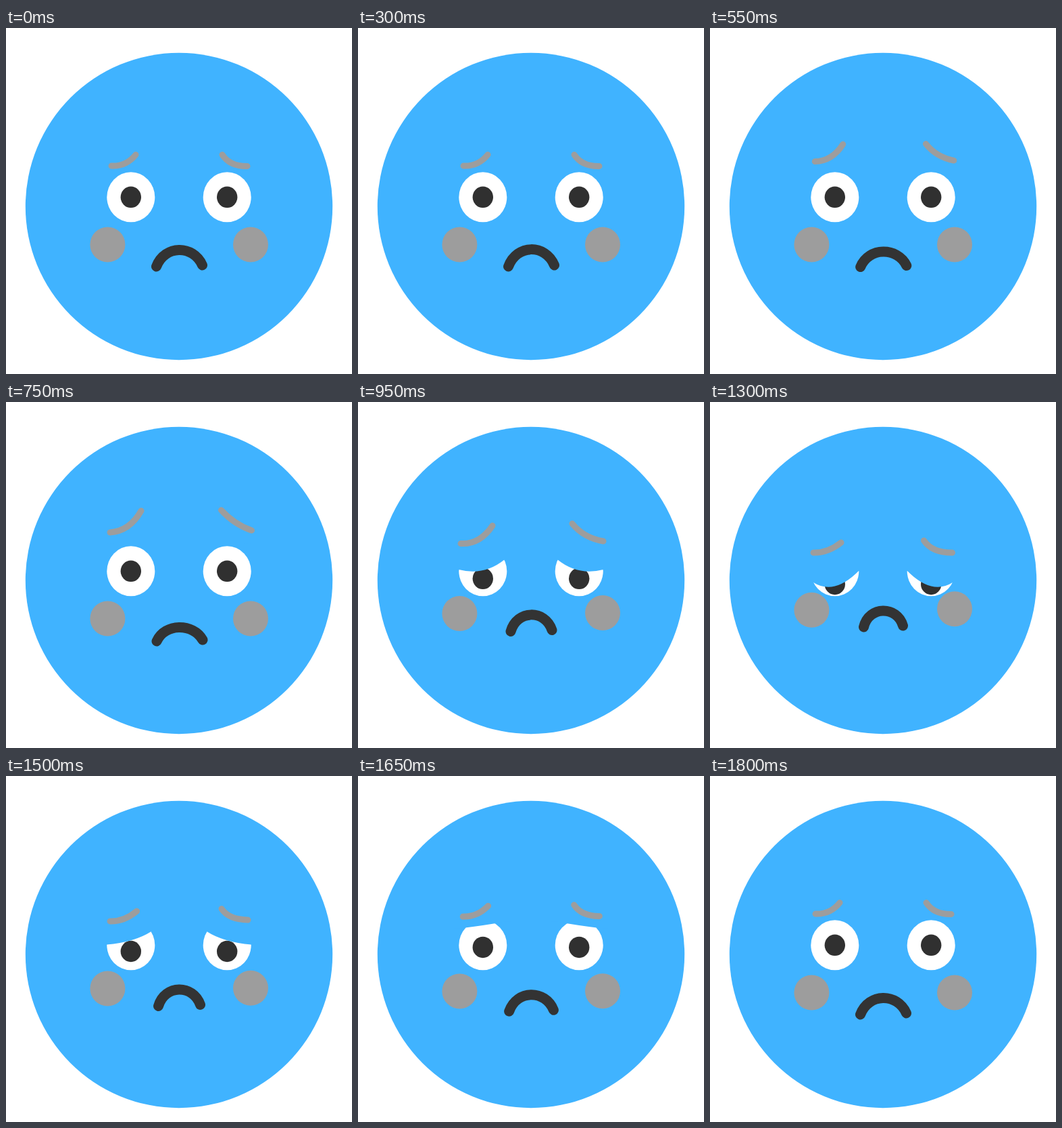
These frames come from a looping animation (512 by 512 pixels, 2000 ms). An HTML page:

```html
<!DOCTYPE html>
<html lang="en">
<head>
<meta charset="utf-8">
<title>Sad face</title>
<style>
  html, body { margin: 0; width: 100%; height: 100%; overflow: hidden; background: #fff; }
  svg { display: block; width: 100%; height: 100%; }
  .line { fill: none; stroke-linecap: round; stroke-linejoin: round; }
  .brow { stroke: #9d9d9d; stroke-width: 9; }
  .mouth { stroke: #333; stroke-width: 15; }
  .skin { fill: #40b3ff; }
  .cheek { fill: #9d9d9d; }
  .pupil { fill: #303030; }
</style>
</head>
<body>
<svg viewBox="0 0 512 512">
  <defs>
    <g id="eye">
      <ellipse cx="184.8" cy="250.3" rx="35.5" ry="37" fill="#fff"/>
      <ellipse id="pupil" class="pupil" cx="184.8" rx="15.2" ry="15.7"/>
      <path id="lid" class="skin"/>
    </g>
  </defs>
  <circle class="skin" cx="256" cy="264" r="227.2"/>
  <use href="#eye"/>
  <use href="#eye" transform="translate(512) scale(-1 1)"/>
  <circle id="cheekL" class="cheek" cx="150.4" r="26"/>
  <circle id="cheekR" class="cheek" cx="362" r="26"/>
  <path id="browL" class="line brow"/>
  <path id="browR" class="line brow"/>
  <path id="mouth" class="line mouth"/>
</svg>
<script>
const LOOP = 2000, STEP = 50;
const openLid = [149, 210, 185, 208, 219, 208];

// brows and lid: start, control, end; mouth: left x, y, right x, arch y
const rest = {
  browL: [156, 204, 178, 205, 192, 187.5],
  browR: [320, 187.5, 331.5, 205, 357, 204.5],
  lid: openLid, mouth: [222.5, 353, 290.5, 320.7], pupil: [250.3], cheek: [320.5]
};
const tense = { ...rest, mouth: [222.5, 353, 290.5, 319.5] };
const raised = {
  browL: [154, 193, 183, 191, 200, 161],
  browR: [318.5, 160, 337.5, 181, 363.5, 190],
  lid: openLid, mouth: [223, 354, 291, 327], pupil: [250.3], cheek: [320.5]
};
const heavy = {
  browL: [152, 209.5, 180.5, 211, 199, 183],
  browR: [317, 180, 334, 201, 363, 206],
  lid: [149, 248, 187, 257.5, 217, 233], mouth: [226, 339.5, 287, 307], pupil: [261.3], cheek: [313]
};
const drowsy = {
  browL: [153, 223, 174.5, 223.5, 194, 208],
  browR: [316.5, 205, 328.5, 223, 358.5, 223],
  lid: [153, 267, 183.5, 286.5, 220, 250], mouth: [227.5, 333, 285.5, 301.3], pupil: [269.5], cheek: [307.8]
};
const waking = {
  browL: [154, 215, 175, 215.5, 193.5, 200],
  browR: [319, 196.5, 329.5, 212.3, 358, 213],
  lid: [149, 249.5, 190, 246, 215, 230], mouth: [225.5, 340.5, 287.5, 308.2], pupil: [259.5], cheek: [314.5]
};

const times = [0, 300, 750, 950, 1300, 1500, 1800, LOOP];
const poses = [rest, tense, raised, heavy, drowsy, waking, rest, rest];

// Monotone cubic: smooth through the poses without overshoot
function slope(v, i) {
  if (i === 0 || i === v.length - 1) return 0;
  const a = (v[i] - v[i - 1]) / (times[i] - times[i - 1]);
  const b = (v[i + 1] - v[i]) / (times[i + 1] - times[i]);
  return a * b > 0 ? 2 * a * b / (a + b) : 0;
}

function blend(v, t) {
  let i = 0;
  while (i < times.length - 2 && t >= times[i + 1]) i++;
  const h = times[i + 1] - times[i], u = (t - times[i]) / h;
  const w = u * u * (3 - 2 * u);
  return v[i] + (v[i + 1] - v[i]) * w
    + h * u * (1 - u) * (slope(v, i) * (1 - u) - slope(v, i + 1) * u);
}

const part = (name, t) => rest[name].map((_, k) => blend(poses.map(p => p[name][k]), t));
const set = (id, attr, value) => document.getElementById(id).setAttribute(attr, value);
const curve = ([x1, y1, cx, cy, x2, y2]) => `M${x1} ${y1}Q${cx} ${cy} ${x2} ${y2}`;

function draw(t) {
  for (const id of ["browL", "browR"]) set(id, "d", curve(part(id, t)));

  const [x1, y1, cx, cy, x2, y2] = part("lid", t);
  set("lid", "d", `M142 ${y1}H${x1}Q${cx} ${cy} ${x2} ${y2}H226V206H142Z`);
  set("pupil", "cy", part("pupil", t)[0]);

  const [cheek] = part("cheek", t);
  set("cheekL", "cy", cheek);
  set("cheekR", "cy", cheek - (rest.cheek[0] - cheek) * 0.12);

  const [left, y, right, arch] = part("mouth", t);
  set("mouth", "d", `M${left} ${y}C235 ${arch} 277 ${arch} ${right} ${y - 2}`);
}

const start = performance.now();
function tick() {
  const t = (performance.now() - start) % LOOP;
  draw(Math.floor(t / STEP) * STEP);
  requestAnimationFrame(tick);
}
draw(0);
requestAnimationFrame(tick);
</script>
</body>
</html>
```
